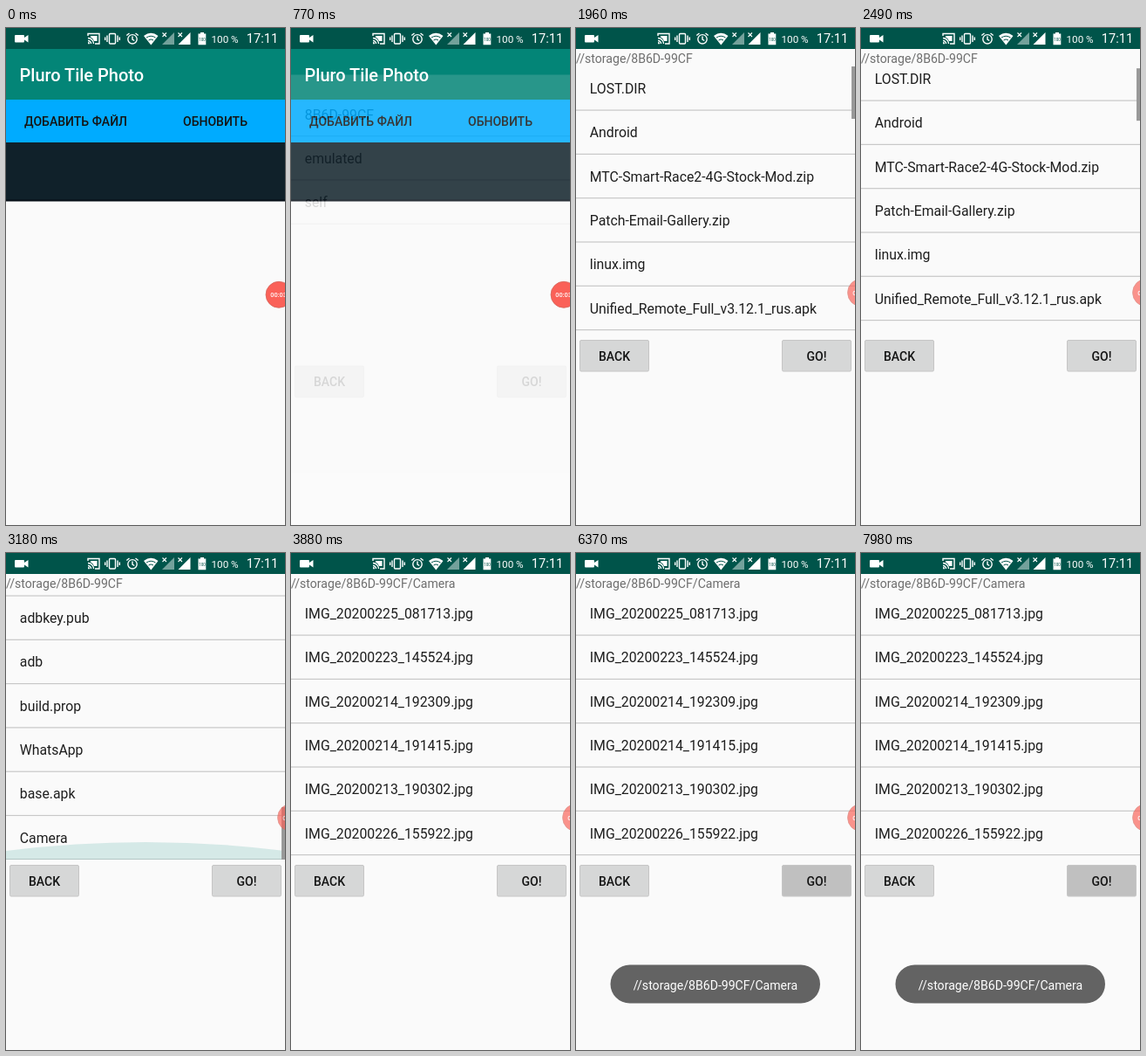
An HTML page for the animation above (8000 ms loop, 320x569 px).

```html
<!DOCTYPE html>
<html lang="ru">
<head>
<meta charset="utf-8">
<title>File picker</title>
<style>
  html, body { margin: 0; width: 100%; height: 100%; overflow: hidden; background: #fafafa; }
  svg { display: block; width: 100%; height: 100%; }
  text { font-family: Roboto, "Noto Sans", sans-serif; }
  .row { font-size: 15.8px; fill: #1e1e1e; }
  .path { font-size: 14.1px; fill: #6e6e6e; }
  .btn { font-size: 14px; font-weight: 500; fill: #141414; text-anchor: middle; }
  .title { font-size: 20px; font-weight: 500; fill: #fff; }
  .toast { font-size: 14.1px; fill: #fff; text-anchor: middle; }
</style>
</head>
<body>
<svg viewBox="0 0 320 569">
  <defs>
    <clipPath id="view"><rect y="44" width="320" height="307"/></clipPath>
  </defs>
  <rect width="320" height="569" fill="#fafafa"/>

  <g id="home">
    <rect y="24" width="320" height="58" fill="#038577"/>
    <text class="title" x="15.5" y="61">Pluro Tile Photo</text>
    <rect y="82" width="320" height="49" fill="#00abff"/>
    <text class="btn" x="80" y="111.5">ДОБАВИТЬ ФАЙЛ</text>
    <text class="btn" x="240" y="111.5">ОБНОВИТЬ</text>
    <rect y="131" width="320" height="67" fill="#10212a"/>
    <rect y="196.5" width="320" height="2" fill="#081018"/>
  </g>

  <g id="picker">
    <rect y="24" width="320" height="600" fill="#fafafa"/>
    <text class="path" id="path" x="0" y="40"></text>
    <g clip-path="url(#view)">
      <rect id="ripple" width="320" height="50.3" fill="#000"/>
      <g id="lists"></g>
      <path id="glow" d="M0 351V341Q160 321 320 341V351Z" fill="#008577"/>
      <rect id="thumb" x="316" width="4" height="60" fill="#999"/>
    </g>
    <g stroke="#c6c6c6" stroke-width="1">
      <rect x="4.5" y="357.5" width="79" height="35.5" rx="1.5" fill="#d6d7d7"/>
      <rect id="go" x="236.5" y="357.5" width="79" height="35.5" rx="1.5" fill="#d6d7d7"/>
    </g>
    <text class="btn" x="44" y="380.5">BACK</text>
    <text class="btn" x="276" y="380.5">GO!</text>
  </g>

  <g id="toast">
    <rect x="39.5" y="471.5" width="240.5" height="44" rx="22" fill="#636363"/>
    <text class="toast" x="160" y="499.5">//storage/8B6D-99CF/Camera</text>
  </g>

  <g id="status" fill="#fff">
    <rect width="320" height="24" fill="#00544a"/>
    <path d="M11 8H20Q21 8 21 9V11L25.5 8V16.5L21 13.5V15.5Q21 16.5 20 16.5H11Q10 16.5 10 15.5V9Q10 8 11 8Z"/>
    <g fill="none" stroke="#fff" stroke-width="1.4">
      <path d="M94 9V6.5H107V18H102M94 11.5A6.5 6.5 0 0 1 100.5 18M94 14.5A3.5 3.5 0 0 1 97.5 18"/>
      <rect x="118.5" y="6.5" width="7" height="11.5" rx="1"/>
      <path d="M116 8.5V16M128 8.5V16M113.7 10.5V14M130.3 10.5V14"/>
      <circle cx="145" cy="12.8" r="5.2"/>
      <path d="M145 9.5V13L147.3 14.5M138.3 8.5L141.5 6M151.7 8.5L148.5 6"/>
      <path d="M179.5 5.5L184 10M184 5.5L179.5 10M197.5 5.5L202 10M202 5.5L197.5 10" stroke-width="1.1"/>
    </g>
    <path d="M97 9H104.5V15H101Q100 11.5 97 10.5Z"/>
    <path d="M94 16A2.2 2.2 0 0 1 96.2 18.2H94Z"/>
    <path d="M158 9Q166.3 2.5 174.5 9L166.3 19.5Z"/>
    <path d="M161 11Q166.3 7.5 171.5 11M163.5 14Q166.3 12 169 14" fill="none" stroke="#00544a"/>
    <path d="M179 19L193 5V19Z" opacity=".45"/>
    <path d="M197.5 19L211.5 5V19Z"/>
    <path d="M220.5 6.5H223V5H227V6.5H229.3V19.3H220.5Z"/>
    <text x="225" y="14.5" font-size="4.5" text-anchor="middle" style="fill:#00544a">100</text>
    <text x="235.5" y="17" font-size="11.7">100 %</text>
    <text x="275.8" y="17.3" font-size="14.6">17:11</text>
  </g>

  <g id="rec">
    <circle r="15" fill="#fa6158" stroke="#d4665c" stroke-width=".8"/>
    <text id="clock" x="-9.7" y="2.7" font-size="7.3" font-weight="500" fill="#fff"></text>
  </g>
</svg>
<script>
const LOOP = 8000, ROW = 50.3, TOP = 44, END = 1252.3;
const $ = id => document.getElementById(id);
const set = (id, attrs) => { for (const k in attrs) $(id).setAttribute(k, attrs[k]); };
const clamp = x => Math.max(0, Math.min(1, x));
const ramp = (t, a, b) => clamp((t - a) / (b - a));
const move = (x, y) => `translate(${x} ${y})`;

const files = {
  roots: ['8B6D-99CF', 'emulated', 'self'],
  card: ['LOST.DIR', 'Android', 'MTC-Smart-Race2-4G-Stock-Mod.zip', 'Patch-Email-Gallery.zip',
    'linux.img', 'Unified_Remote_Full_v3.12.1_rus.apk', 'Music', 'Movies', 'Download', 'DCIM',
    'Pictures', 'Alarms', 'Ringtones', 'Podcasts', 'Notifications', 'Documents', 'boot.img',
    'recovery.img', 'system.img', 'backup.zip', 'notes.txt', 'log.txt', 'kernel.img', 'update.zip',
    'Books', 'adbkey.pub', 'adb', 'build.prop', 'WhatsApp', 'base.apk', 'Camera'],
  camera: ['25_081713', '23_145524', '14_192309', '14_191415', '13_190302', '26_155922']
    .map(s => `IMG_202002${s}.jpg`)
};
const paths = { roots: '', card: '//storage/8B6D-99CF', camera: '//storage/8B6D-99CF/Camera' };

$('lists').innerHTML = Object.keys(files).map(name => `<g id="${name}">` +
  files[name].map((s, i) => {
    const y = TOP + i * ROW;
    return `<text class="row" x="15.8" y="${y + 31}">${s}</text>` +
      `<rect y="${y + ROW - 0.8}" width="320" height="1.2" fill="#c8c8c8"/>`;
  }).join('') + '</g>').join('');

const bursts = [[0, 0, 1], [110, 570, 5], [770, 1530, 8], [1630, 2390, 8], [2490, 3280, 8],
  [3380, 3880, 6], [4080, 4210, 2], [4570, 4570, 1], [4970, 5070, 2], [5270, 5670, 5],
  [5870, 6170, 4], [6370, 6670, 4], [6900, 7290, 4], [7490, 7590, 2], [7850, 7980, 2]];

function snap(t) {
  const [a, b, n] = bursts.filter(s => s[0] <= t).pop();
  if (n < 2) return a;
  const step = (b - a) / (n - 1);
  return a + step * Math.min(n - 1, Math.floor((t - a) / step + 1e-6));
}

function scrollAt(t) {
  if (t < 2480) return 0;
  return 11 + (END - 11) * ramp(t, 2490, 3090) ** 1.4;
}

function render(time) {
  const t = snap(time);

  const open = ramp(t, 740, 1040);
  set('picker', { opacity: clamp(open * 1.5), transform: move(0, 45 * (1 - open) ** 4) });

  const shown = t < 1620 ? 'roots' : t < 3770 ? 'card' : 'camera';
  for (const name in files) set(name, { display: name === shown ? 'inline' : 'none' });
  $('path').textContent = paths[shown];

  const scroll = scrollAt(t);
  set('card', { transform: move(0, -scroll) });
  set('thumb', {
    y: TOP + scroll / END * 247,
    opacity: shown === 'card' ? 1 - ramp(t, 3400, 3700) : 0
  });
  set('glow', { opacity: 0.15 * ramp(t, 3020, 3160) * (1 - ramp(t, 3200, 3480)) });

  const first = shown === 'roots' ? ramp(t, 1250, 1500) : 0;
  const last = shown === 'card' ? ramp(t, 3500, 3680) : 0;
  set('ripple', { y: last ? 301 : TOP, opacity: 0.1 * (first + last) });

  set('go', { fill: t < 4960 ? '#d6d7d7' : t < 5060 ? '#cbcbcb' : '#c0c0c0' });
  set('toast', { opacity: ramp(t, 5200, 5650) });

  const dock = ramp(t, 1600, 1900);
  set('rec', {
    transform: move(313 + 14.5 * dock, 305.3 - 2.3 * dock) + ` scale(${1 + 0.06 * dock})`,
    opacity: 1 - 0.32 * dock
  });
  $('clock').textContent = '00:0' + (3 + Math.floor(t / 1000)) % 10;
}

function tick(now) {
  render(now % LOOP);
  requestAnimationFrame(tick);
}
render(0);
requestAnimationFrame(tick);
</script>
</body>
</html>
```
